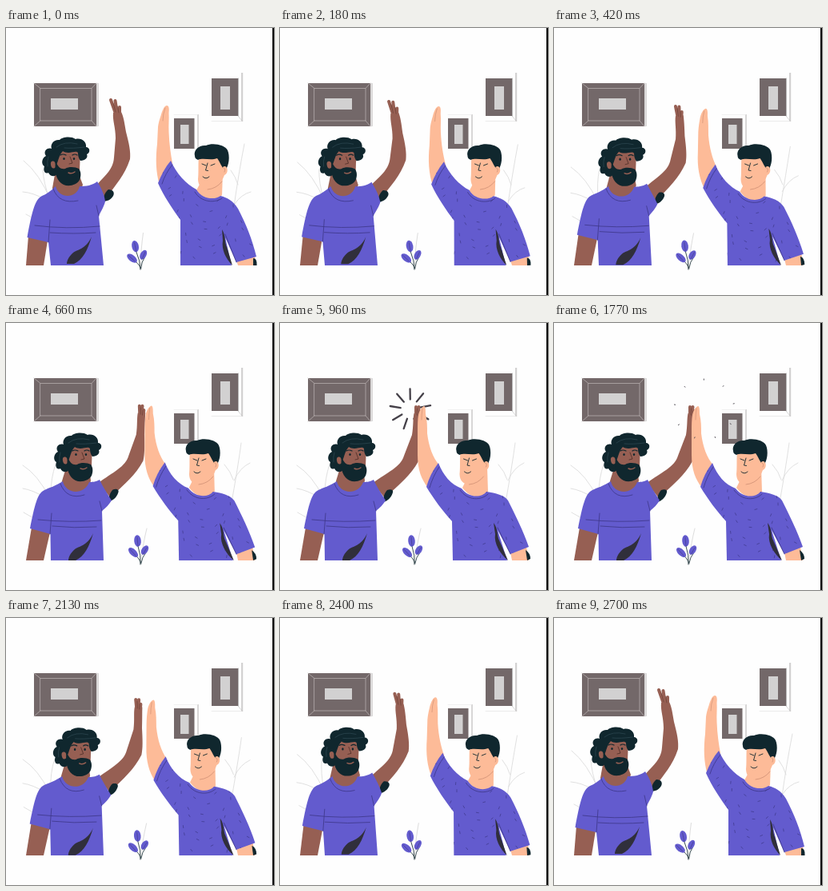
These frames come from a looping animation (335x334 px, 2760 ms). An HTML page with a canvas:

```html
<!DOCTYPE html>
<html lang="en">
<head>
<meta charset="utf-8">
<title>High five</title>
<style>
html, body { margin: 0; width: 100%; height: 100%; overflow: hidden; background: #fefefe; }
canvas { display: block; }
</style>
</head>
<body>
<canvas id="stage" width="335" height="334"></canvas>
<script>
const ctx = document.getElementById('stage').getContext('2d');
const LOOP = 2760;
const BLUE = '#635bce', NAVY = '#10272e', DARK = '#302f3b', BROWN = '#965f53',
      PEACH = '#fdbb98', TAUPE = '#736869', PALE = '#d2d1d1', LINE = '#3d3787';

// Eased progress of time t between two moments
const ease = (t, from, to) => {
  const x = Math.min(1, Math.max(0, (t - from) / (to - from)));
  return x * x * (3 - 2 * x);
};

// Blend two path strings that share one structure
const mix = (a, b, p) => {
  const ends = b.match(/-?[\d.]+/g);
  let i = 0;
  return a.replace(/-?[\d.]+/g, n => +n + (ends[i++] - n) * p);
};

const fill = (path, color) => {
  ctx.fillStyle = color;
  ctx.fill(new Path2D(path));
};
const stroke = (path, color, width = 1) => {
  ctx.strokeStyle = color;
  ctx.lineWidth = width;
  ctx.lineCap = ctx.lineJoin = 'round';
  ctx.stroke(new Path2D(path));
};
const rect = (x, y, w, h, color) => {
  ctx.fillStyle = color;
  ctx.fillRect(x, y, w, h);
};
const oval = (x, y, rx, ry, turn, color) => {
  ctx.fillStyle = color;
  ctx.beginPath();
  ctx.ellipse(x, y, rx, ry, turn, 0, 7);
  ctx.fill();
};
const group = (x, y, draw) => {
  ctx.save();
  ctx.translate(x, y);
  draw();
  ctx.restore();
};

function pictures() {
  rect(113, 69, 3, 54, '#dcdada');
  rect(35, 69, 78, 54, TAUPE);
  stroke('M43 75.5H107V116H43ZM35 69L43 75.5M113 69L107 75.5M35 123L43 116M113 123L107 116', '#b5adad', 0.8);
  rect(56, 88, 34, 14, PALE);

  rect(294, 56, 2.2, 61, '#d2d1d1');
  stroke('M257 116.5H294', '#ebebeb');
  stroke('M290 110L295 116', '#c8c8c8', 0.7);
  rect(257, 63, 33, 47, TAUPE);
  stroke('M290.5 63V110', '#aaa', 0.8);
  rect(268, 73, 12, 29, PALE);

  rect(239, 108, 2, 43, '#d8d7d7');
  stroke('M210 108.5H239', '#f0f0f0');
  rect(210, 113, 25.5, 38, TAUPE);
  rect(218, 121, 10.5, 24, PALE);
}

function plants(p) {
  const left = mix(
    'M22 166Q42 182 56 216M21 205Q34 206 48 214M46 177Q47 195 54 212M25 233L38 240',
    'M21 178Q40 190 54 218M21 207Q34 209 48 218M62 177Q56 194 56 214M22 237L36 245', p);
  const right = mix(
    'M298 145Q291 180 284 230M281 178Q287 186 290 196M306 205Q294 208 286 220',
    'M294 150Q290 180 281 230M273 177Q281 186 284 196M305 175Q292 181 285 197', p);
  stroke(left + right, '#d9d9d9', 0.8);

  ctx.save();
  ctx.translate(169, 302);
  ctx.rotate(0.1 * (p - 1));
  stroke('M-1 0Q2 -25 7 -45', '#d5d5d5', 0.8);
  stroke('M-1 0Q0 -11 -4 -23M0 -1Q-3 -9 -9 -13M0 -2Q1 -9 6 -15', NAVY, 0.8);
  oval(-4.5, -29.5, 4.3, 7.3, -0.1, BLUE);
  oval(-10, -15, 4, 7.5, -0.8, BLUE);
  oval(4.5, -18, 3.8, 6.3, 0.6, BLUE);
  stroke('M-5 -34L-4 -23M-14 -19L-7 -11M7 -21L2 -12', LINE, 0.6);
  ctx.restore();
}

function leftMan(arm, body) {
  fill(mix('M28 260L52 266L47 297L25 297Z', 'M32 256L55 262L47 297L25 297Z', body), BROWN);
  fill(mix('M62 178L58 200C62 220 90 220 96 196L90 180Z',
           'M76 178L69 201C74 221 102 221 106 197L104 180Z', body), BROWN);

  fill(mix('M112 198C122 186 134 178 135 162L137 138C137 124 133 116 134 106L144 105C147 111 148 118 150 130C154 145 156 155 155 164C148 185 138 195 124 214Z',
           'M116 200C134 187 151 180 155 166L165 140C167 128 166 120 167.5 113L177 113C176 120 176 128 175 140C175 155 175 164 173 173C163 191 150 201 131 219Z', arm), BROWN);
  stroke(mix('M137 107L131 90M139 107L136.5 91M142 107L142 99',
             'M170 116L170 105M172 116L173.5 105M174 118L175 110', arm), BROWN, 4);
  stroke(mix('M137 105L134 94M141 106L139.5 98', 'M171 115L171.5 107M173 116L174 110', arm), '#63392f', 0.6);
  fill(mix('M128 202C134 202 136 206 134 210C131 215 126 217 121 217C122 210 124 205 128 202Z',
           'M134 209C139 207 142 209 141 212C139 219 134 223 129 224C129 217 131 212 134 209Z', arm), NAVY);

  fill(mix('M62 198C56 204 50 208 45 210C36 214 32 232 26.5 262L53 268L56 297L122 297L116 235C119 229 123 222 124 217C123 208 119 200 114 192C108 197 100 198 92 198C88 214 66 214 62 198Z',
           'M71 198C62 204 54 206 48 209C39 213 36 228 30 257L55.5 264L56 297L122 297L120 235C125 231 129 227 132 222C127 214 121 205 117 196C112 199 107 199 104 199C98 215 75 215 71 198Z', body), BLUE);
  stroke(mix('M59 201Q66 221 90 216M36 247Q75 252 117 248M55 256Q85 258 112 256M53 268L55 240M116 235L113 222',
             'M68 201Q76 222 98 215M40 246Q80 250 119 247M58 254Q85 257 113 255M55 264L57 238M120 235L117 223', body), LINE, 0.8);
  group(2 * body, 2 * body, () =>
    fill('M107 261C100 276 92 276 84 281C78 286 76 292 76 295L85 295C96 290 102 278 107 261Z', DARK));

  group(15 * (body - 1), body - 1, () => {
    fill('M79 152L75 178C80 194 104 194 107 180L108 152Z', BROWN);
    fill('M108 167C114 167 118 163 116 159C121 157 120 150 115 150C116 143 109 138 102 140C97 136 85 137 82 141C75 140 70 146 72 152C66 150 61 156 65 161C59 164 59 172 63 174C61 180 64 184 68 182C70 187 77 188 79 183L78 172C81 166 81 160 86 155C94 160 102 153 105 157C105 162 106 164 108 167Z', NAVY);
    oval(74, 172, 3, 4.5, -0.2, BROWN);
    fill('M77 167C80 176 84 178 89 177C94 174 102 175 106 177C109 181 109 186 107 191C104 197 94 200 87 197C79 193 75 184 77 167Z', NAVY);
    stroke('M78 150Q88 142 104 146M88 151Q98 152 113 150M68 162Q66 168 67 174', '#34505a', 0.6);
    stroke('M83 160Q86 158 90 160M98 160Q101 158 104 160', NAVY, 1.2);
    oval(87.5, 164.5, 1.2, 1.6, 0, NAVY);
    oval(100, 164.5, 1.2, 1.6, 0, NAVY);
    stroke('M95 162L98 170L94 171', '#4e2c26', 0.8);
    stroke('M93 182Q97 184 101 181', BROWN, 1.4);
  });
}

// Short marks scattered over the patterned shirt
const marks = Array.from({ length: 62 }, (_, i) => {
  const x = 188 + (i * 0.618 % 1) * 122, y = 176 + (i * 0.381966 * 1.7 % 1) * 118;
  const turn = i * 2.4;
  return `M${x} ${y}l${3 * Math.cos(turn)} ${3 * Math.sin(turn)}`;
}).join('');

function rightMan(arm, body, nudge) {
  fill(mix('M192 196C187 180 187 162 189 145L190 124C191 116 193 112 194 108C196 102 198 97 201 97C204 97 204 102 203.5 106C204 114 203 122 203.5 130C204 145 206 158 208 169Z',
           'M185 206C177 196 172 184 172 165L172 135C172 128 172 122 173 115C174 110 177 105 180 104C182 104 182 110 182 114C184 122 184 130 184 138C186 155 191 168 199 178Z', arm), PEACH);
  stroke(mix('M199 100Q196 108 196 116', 'M178 107Q177 114 177 121', arm), '#c98a70', 0.6);
  fill(mix('M288 291L311 285L312 297L290 297Z', 'M288 287L308 280L311 297L290 297Z', body), PEACH);
  fill(mix('M309 288Q314 288 313.5 297L309 297Z', 'M307 284Q313 288 313 295L309 297Z', body), NAVY);

  const neck = mix('M245 190L238 203C248 218 262 218 270 209L271 180Z',
                   'M235 192L228 206C238 220 252 220 260 211L259 180Z', body);
  const shirt = mix('M206 166C212 181 226 196 238 202C245 215 262 215 268 210C276 212 284 216 290 226C300 245 308 265 313 286L288 293L274 262L282 297L218 297L218 240C208 226 197 210 190 194C194 184 199 174 206 166Z',
                    'M198 175C204 191 214 202 227 207C236 219 252 219 258 211C270 213 280 215 285 222C294 240 304 260 311 280L288 289L272 259L284 297L216 297L215 248C204 236 192 220 183 205C186 194 191 184 198 175Z', arm);
  fill(neck, PEACH);
  fill(shirt, BLUE);
  ctx.save();
  ctx.clip(new Path2D(shirt));
  group(4 * (1 - arm), -4 * (1 - arm), () => stroke(marks, LINE, 0.7));
  ctx.restore();
  fill(mix('M270 252C275 260 273 268 276 274L283 297C275 289 269 277 271 266Z',
           'M267 250C273 258 271 266 274 272L285 297C275 289 267 275 269 264Z', body), DARK);
  stroke(mix('M274 258L288 293M195 195Q199 182 208 171M236 205C244 219 262 219 270 213',
             'M272 256L288 289M187 206Q191 192 199 180M225 209C235 223 252 222 260 214', arm), LINE, 0.8);

  group(12 * (1 - body) - nudge, 0, () => {
    fill('M229 160C228 172 229 181 228 189C228 197 233 202 240 202C249 201 257 195 261 184C266 182 266 174 261 171L261 158Z', PEACH);
    fill('M224 160C222 152 230 146 238 147C246 143 262 146 265 153C268 160 267 172 262 178C257 174 256 168 252 163C244 166 234 162 228 165C225 164 224 162 224 160Z', NAVY);
    oval(261, 177, 2.8, 4, 0.2, PEACH);
    stroke('M233 170L238 172M244 172L249 170M240 169L237.5 178L240.5 178.5M234 186Q238 190 242 186', NAVY, 0.9);
    stroke('M260 175Q263 176 261 180M240 202Q251 201 258 192', '#c98a70', 0.7);
  });
}

// Nine rays fly out of a centre and shrink to dots
function burst(x, y, age) {
  if (age <= 0 || age > 470) return;
  const k = age / 470;
  const outer = 38 * (1 - (1 - k) ** 2.9);
  const inner = Math.min(outer, 38 * k ** 0.98);
  let rays = '';
  for (let i = 0; i < 9; i++) {
    const a = (i * 40 - 91) * Math.PI / 180, c = Math.cos(a), s = Math.sin(a);
    rays += `M${x + inner * c} ${y + inner * s}L${x + outer * c} ${y + outer * s}`;
  }
  stroke(rays, '#454149', 2.3 * Math.min(1, (1 - k) * 3 + 0.3));
}

function draw(t) {
  const arm = ease(t, 0, 800) - ease(t, 1900, 2700);
  const body = ease(t, 0, 680) - ease(t, 2000, 2700);
  const nudge = 3.5 * (ease(t, 650, 930) - ease(t, 980, 1330));
  rect(0, 0, 335, 334, '#fefefe');
  pictures();
  plants(body);
  burst(163, 108, t - 810);
  leftMan(arm, body);
  rightMan(arm, arm, nudge);
  burst(188, 108, t - 1315);
  rect(333, 0, 2, 334, '#000');
}

function tick() {
  const t = performance.now() % LOOP;
  draw(t - t % 30);
  requestAnimationFrame(tick);
}
tick();
</script>
</body>
</html>
```
